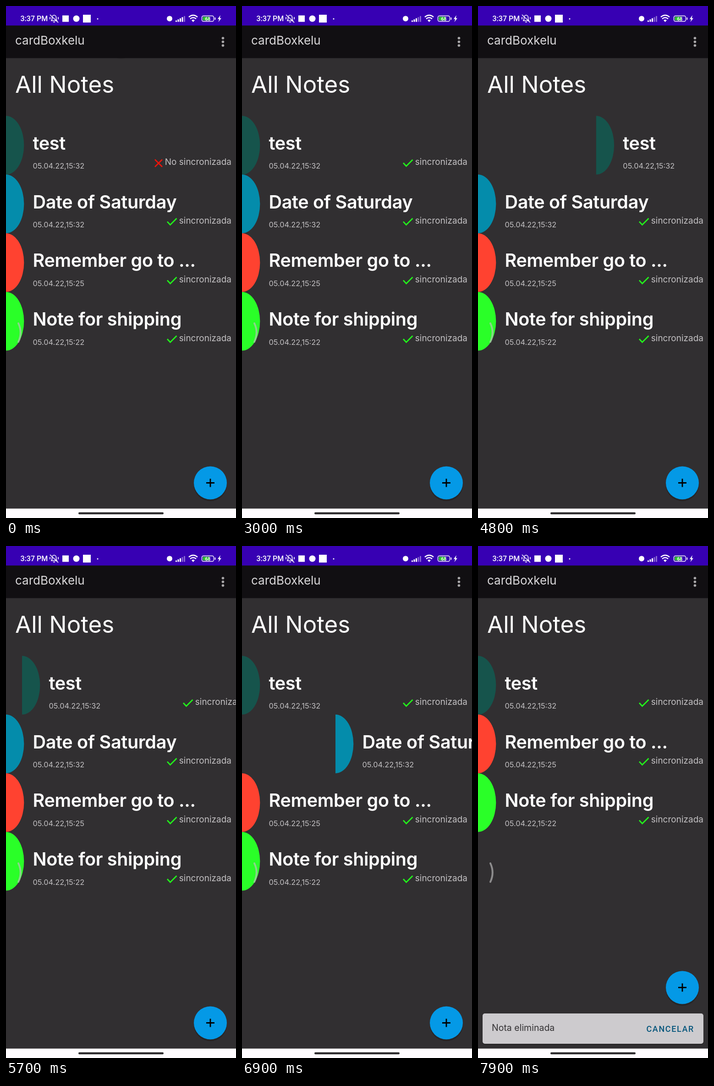
Write an HTML page that moves like this. It is 502x1115 px and loops after 8 s.

```html
<!DOCTYPE html>
<html lang="es">
<head>
<meta charset="utf-8">
<title>Notes</title>
<style>
  html, body { margin: 0; width: 100%; height: 100%; overflow: hidden; background: #312f31; }
  svg { display: block; width: 100%; height: 100%; font-family: Inter, sans-serif; }
  .line { fill: none; stroke-width: 2.8; }
  .small { fill: #c3c1c3; }
  .roboto { font-family: Roboto, sans-serif; font-weight: 500; }
</style>
</head>
<body>
<svg viewBox="0 0 502 1115">
  <rect width="502" height="1115" fill="#312f31"/>
  <text x="20" y="189" font-size="51" fill="#fff">All Notes</text>
  <g id="rows"></g>
  <path id="glow" d="M0 240H502V247Q251 293 0 247Z" fill="#068ead" opacity="0"/>

  <g id="spinner">
    <circle cy="1.5" r="26.5" fill="#000" opacity=".15"/>
    <circle r="26" fill="#fdfbff"/>
    <circle id="arc" r="11.5" pathLength="360" fill="none" stroke="#111" stroke-width="3.2"/>
  </g>

  <rect y="42" width="502" height="71.5" fill="#110f12"/>
  <text x="20" y="84" font-size="26" fill="#dad8da">cardBoxkelu</text>
  <g fill="#a9a7a9">
    <circle cx="473.5" cy="70" r="2.8"/><circle cx="473.5" cy="78" r="2.8"/><circle cx="473.5" cy="86" r="2.8"/>
  </g>

  <rect width="502" height="42.5" fill="#3700b3"/>
  <g fill="#fff">
    <text class="roboto" x="31.5" y="33" font-size="16">3:37 PM</text>
    <g fill="none" stroke="#fff" stroke-width="1.7">
      <path d="M99 32H111L109.5 29V25A4.5 5 0 0 0 100.5 25V29ZM103 35H107M96 19L114 36M96 24V29M114 24V29"/>
      <path d="M399 24Q408.5 16 418 24M402 28Q408.5 22.5 415 28" stroke-width="2.5"/>
      <rect x="427.5" y="21.5" width="26" height="12" rx="3.5" stroke-width="1.4"/>
    </g>
    <rect x="123" y="20.5" width="14" height="14"/>
    <circle cx="153.5" cy="27.5" r="7"/>
    <rect x="168" y="19" width="17" height="17"/>
    <circle cx="200" cy="28" r="1.5"/>
    <circle cx="357" cy="27.5" r="6"/>
    <g id="signal"></g>
    <path d="M405 31Q408.5 28 412 31L408.5 35ZM455.5 25h1.8v5h-1.8ZM468 20L462 28.5H465.5L463.5 35L470 26.5H466.5Z"/>
    <rect x="429.5" y="23.5" width="15" height="8" rx="1.5" fill="#31c631"/>
    <text class="roboto" x="440.5" y="31.5" font-size="10.5" text-anchor="middle">68</text>
  </g>

  <path d="M27 691Q36.5 711 27 731.5" fill="none" stroke="#bebebe" stroke-opacity=".65" stroke-width="4" stroke-linecap="round"/>

  <g id="fab">
    <circle cx="446" cy="1042.5" r="36" fill="#000" opacity=".2"/>
    <circle cx="446" cy="1038.5" r="36" fill="#0499e6"/>
    <path d="M437 1038.5H455M446 1029.5V1047.5" class="line" stroke="#000"/>
  </g>

  <g id="snack">
    <rect x="9.5" y="1020" width="483" height="66" rx="5" fill="#000" opacity=".2"/>
    <rect x="10" y="1018" width="482" height="66" rx="5" fill="#cdcbce"/>
    <text x="30" y="1056" font-size="19.5" fill="#343234">Nota eliminada</text>
    <text class="roboto" x="367.5" y="1058" font-size="18" letter-spacing="1.6" fill="#06567c">CANCELAR</text>
  </g>

  <rect y="1094.5" width="502" height="21" fill="#fffcff"/>
  <rect x="158" y="1102.5" width="186" height="4.5" rx="2.2" fill="#302e30"/>
</svg>
<script>
const $ = id => document.getElementById(id);
const LOOP = 8000, STEP = 100, TOP = 239.3, PITCH = 127.8;

const notes = [
  ['test', '05.04.22,15:32', '#16544c'],
  ['Date of Saturday', '05.04.22,15:32', '#048cab'],
  ['Remember go to ...', '05.04.22,15:25', '#ff4230'],
  ['Note for shipping', '05.04.22,15:22', '#2aff28'],
];

const status = (id, label, color, icon) => `<g id="${id}">
  <path class="line" stroke="${color}" d="${icon}"/>
  <text class="small" x="492" y="107" font-size="19" text-anchor="end">${label}</text></g>`;
const synced = i => status('synced' + i, 'sincronizada', '#22f51b', 'M352 102.5L358.5 109.5L372.5 95.5');
const unsynced = status('unsynced', 'No sincronizada', '#e8150c', 'M325 95L341 111M341 95L325 111');

$('rows').innerHTML = notes.map(([title, date, color], i) => `<g id="row${i}">
  <path d="M0 0A39.3 63.9 0 0 1 0 127.8Z" fill="${color}"/>
  <text x="58.5" y="73.5" font-size="39.5" font-weight="600" letter-spacing="-.3" fill="#fff">${title}</text>
  <text class="small" x="58.5" y="115" font-size="16.3">${date}</text>
  ${synced(i)}${i ? '' : unsynced}</g>`).join('');

$('signal').innerHTML = [0, 1, 2, 3, 4].map(i =>
  `<rect x="${370 + i * 4.5}" y="${31.5 - i * 2.4}" width="3" height="${3 + i * 2.4}"/>`).join('');

// Linear interpolation through [time, value] points
function track(t, ...points) {
  if (t <= points[0][0]) return points[0][1];
  for (let i = 1; i < points.length; i++) {
    const [t0, v0] = points[i - 1], [t1, v1] = points[i];
    if (t < t1) return v0 + (v1 - v0) * (t - t0) / (t1 - t0);
  }
  return points[points.length - 1][1];
}
const ramp = (t, from, to) => {
  const p = track(t, [from, 0], [to, 1]);
  return p * p * (3 - 2 * p);
};
const move = (id, x, y, extra = '') => $(id).setAttribute('transform', `translate(${x} ${y})${extra}`);
const fade = (id, value) => $(id).setAttribute('opacity', value);

function drawSpinner(t) {
  const y = track(t, [950, 87], [1150, 165], [1250, 188], [1400, 170]);
  move('spinner', 251, y, ` scale(${1 - ramp(t, 2250, 2450)})`);
  const since = t - 1400;
  const length = 150 + 110 * Math.cos(since * 2 * Math.PI / 1332);
  $('arc').setAttribute('stroke-dasharray', `${length} ${360 - length}`);
  $('arc').setAttribute('transform', `rotate(${-85 + since * 0.27})`);
  fade('glow', track(t, [1000, 0], [1250, 0.09], [1400, 0.06], [1900, 0]));
}

function drawRows(t) {
  const done = ramp(t, 2200, 2400);
  fade('synced0', done);
  fade('unsynced', 1 - done);
  const shift = PITCH * ramp(t, 7100, 7400);
  const swipe = [
    track(t, [3400, 0], [3700, 110], [4000, 236], [4300, 265], [5000, 255], [5400, 185], [5700, 35], [5800, 0]),
    track(t, [6500, 0], [6700, 75], [6900, 204], [7100, 502]),
  ];
  notes.forEach((_, i) => move('row' + i, swipe[i] || 0, TOP + i * PITCH - (i > 1 ? shift : 0)));
}

function drawSnackbar(t) {
  const p = ramp(t, 7100, 7350), scale = 0.8 + 0.2 * p;
  fade('snack', p);
  move('snack', 251 * (1 - scale), 1051 * (1 - scale), ` scale(${scale})`);
  move('fab', 0, -77 * p);
}

function draw(now) {
  const t = Math.floor(now % LOOP / STEP) * STEP;
  const strength = t < 500 ? 4 : 3;
  [...$('signal').children].forEach((bar, i) => bar.setAttribute('opacity', i < strength ? 1 : 0.4));
  drawSpinner(t);
  drawRows(t);
  drawSnackbar(t);
}

const start = performance.now();
function frame() {
  draw(performance.now() - start);
  requestAnimationFrame(frame);
}
frame();
</script>
</body>
</html>
```
